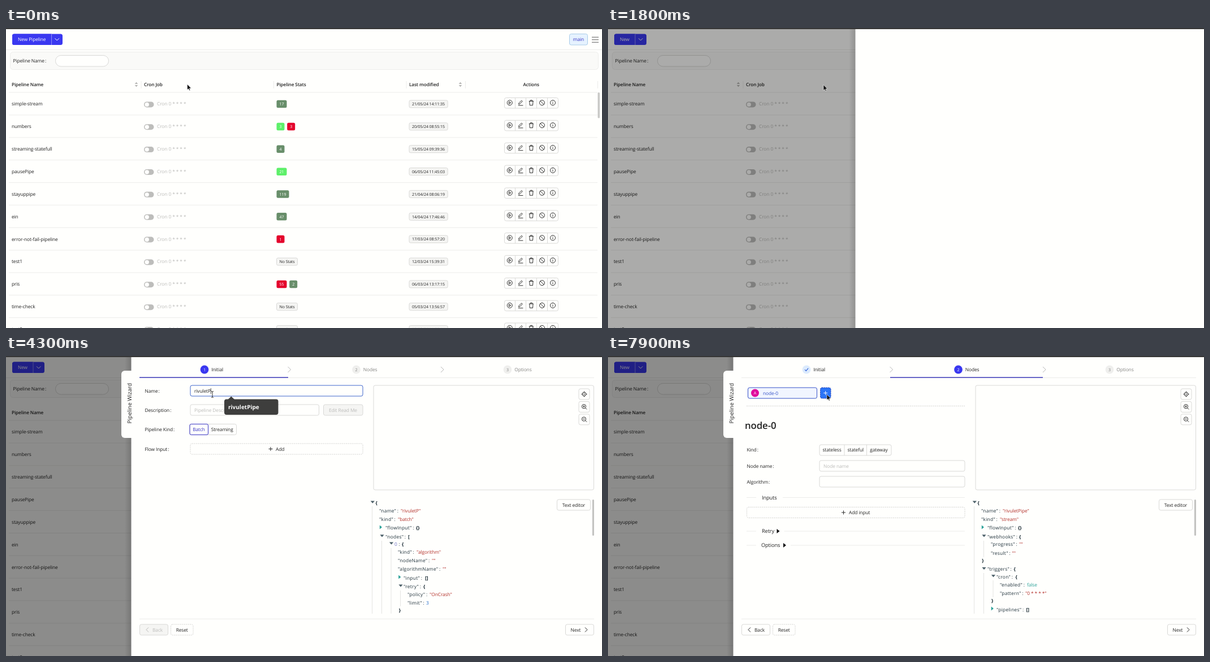
Animation, 1054 px wide and 531 px high, one loop 8000 ms. Source, as an HTML page:

```html
<!DOCTYPE html>
<html lang="en">
<head>
<meta charset="utf-8">
<title>Pipeline wizard</title>
<style>
  html, body { margin: 0; width: 100%; height: 100%; overflow: hidden; background: #fffffd; }
  svg { display: block; width: 100%; height: 100%; }
  text { font: 8.4px "Open Sans", "Noto Sans", sans-serif; letter-spacing: -.1px; fill: #222;
         text-rendering: geometricPrecision; white-space: pre; }
  .b { font-weight: 600; font-size: 8.2px; }
  .mid { text-anchor: middle; }
  .w { fill: #fff; }
  .dim { fill: #bcbcba; }
  .gray { fill: #858583; }
  .s { font-size: 7.1px; }
  .blue { fill: #3733c4; }
  .key { fill: #20323c; letter-spacing: .25px; }
  .str { fill: #b3302a; }
  .num { fill: #2a6fc9; }
  .bool { fill: #2aa198; }
  .br { font-weight: 700; fill: #14252e; }
  .div { font-size: 9.2px; }
  .box { fill: #fffffd; stroke: #d9d9d7; }
  .off { fill: #f5f5f3; stroke: #d9d9d7; }
  .dash { fill: #fffffd; stroke: #d2d2d0; stroke-dasharray: 2 1.4; }
  .line { stroke: #ececea; fill: none; }
  .ico { fill: none; stroke: #222; stroke-width: .95; }
</style>
</head>
<body>
<svg id="stage" viewBox="0 0 1054 531" preserveAspectRatio="none"></svg>
<script>
const LOOP = 8000, STEP = 100;
const PAPER = '#fffffd', PRIMARY = '#3a38f0', HOVER = '#4278f2', PIPE = 'rivuletPipe';

// drawing helpers
const text = (x, y, s, cls = '', more = '') => `<text x="${x}" y="${y}" class="${cls}" ${more}>${s}</text>`;
const rect = (x1, y1, x2, y2, r = 0, more = 'class="box"') =>
  `<rect x="${x1}" y="${y1}" width="${x2 - x1}" height="${y2 - y1}" rx="${r}" ${more}/>`;
const path = (d, more = 'class="ico"') => `<path d="${d}" ${more}/>`;
const disc = (x, y, r, more = 'class="ico"') => `<circle cx="${x}" cy="${y}" r="${r}" ${more}/>`;
const hline = (x1, x2, y, cls = 'line') => path(`M${x1} ${y}H${x2}`, `class="${cls}"`);
const group = (id, body, more = '') => `<g id="${id}" ${more}>${body}</g>`;
const label = (y, s) => text(245.5, y, `${s}<tspan dx="1">:</tspan>`);
const plus = (x, y, color = '#222') => path(`M${x - 3.5} ${y}h7M${x} ${y - 3.5}v7`, `class="ico" style="stroke:${color}"`);
const chevron = (x, y, w, color) =>
  path(`M${x - w / 2} ${y - Math.abs(w)}l${w} ${Math.abs(w)}l${-w} ${Math.abs(w)}`, `fill="none" stroke="${color}"`);

// page with the table
const GREEN = '#688e6a', LIME = '#5ef06a', RED = '#e4042c';
const ROWS = [
  ['simple-stream', '21/05/24 14:11:35', [17, GREEN]],
  ['numbers', '20/05/24 08:55:15', [3, LIME], [3, RED]],
  ['streaming-statefull', '15/05/24 09:39:36', [4, GREEN]],
  ['pausePipe', '06/05/24 11:45:03', [21, LIME]],
  ['stayuppipe', '21/04/24 08:06:19', [119, GREEN]],
  ['ein', '14/04/24 17:46:46', [47, GREEN]],
  ['error-not-fail-pipeline', '17/03/24 08:57:20', [1, RED]],
  ['test1', '12/03/24 15:39:31'],
  ['pris', '06/03/24 13:17:15', [55, RED], [2, GREEN]],
  ['time-check', '05/03/24 13:56:57'],
  ['test2', '05/03/24 11:20:41']
];

function splitButton(name, mid, end) {
  return rect(11, 10.5, end, 30, 3.5, `fill="${PRIMARY}"`) +
    path(`M14.5 10.5H${mid}V30H14.5a3.5 3.5 0 0 1-3.5-3.5V14a3.5 3.5 0 0 1 3.5-3.5`, `class="face" fill="${PRIMARY}"`) +
    path(`M${mid} 10.5V30`, 'stroke="#8f8ff8"') +
    text((11 + mid) / 2, 23.2, name, 'w mid') +
    path(`M${mid + 6} 18.3l3.7 3.7 3.7-3.7`, 'fill="none" stroke="#fff"');
}

function actions() {
  let s = rect(881.5, 123.5, 976.5, 142, 3);
  for (let i = 1; i < 5; i++) s += path(`M${881.5 + i * 19} 123.5V142`, 'stroke="#d9d9d7"');
  for (const x of [890.8, 948, 967]) s += disc(x, 132.3, 4.5);
  return s + path('M889.4 130.2v4.2l3.6-2.1z') +
    path('M905.8 137h8.6M906.6 135l.5-2.2 4.6-4.6 1.6 1.6-4.6 4.6z') +
    path('M924.8 129.5h8.2M927.3 129.3v-1.5h3.2v1.5M925.8 129.8l.5 7h5.2l.5-7') +
    path('M944.9 129.1l6.3 6.3') + path('M967 131.6v3M967 129.6v1');
}

function tableRow([name, date, ...stats], i) {
  const y = 134.4 + i * 39.86;
  let s = text(10, y + 3, name) +
    rect(244, y - 4, 261.5, y + 6, 5, 'fill="#bdbdbb"') + disc(249.2, y + 1, 3.7, 'fill="#fffffd"') +
    text(267, y + 3, 'Cron 0 * * * *', 'dim');
  let x = 478.5;
  for (const [n, color] of stats) {
    const w = 10 + 4 * String(n).length;
    s += rect(x, y - 6.6, x + w, y + 6.9, 2.5, `fill="${color}"`) + text(x + w / 2, y + 3, n, 's w mid');
    x += w + 4.7;
  }
  if (!stats.length) s += rect(478.5, y - 6.4, 515.5, y + 6.6, 2.5, 'class="off"') + text(497, y + 2.8, 'No Stats', 's mid');
  s += `<g class="date">${rect(713, y - 6.4, 781.2, y + 6.6, 2.5, 'class="off"')}${text(747, y + 2.9, date, 's mid')}</g>`;
  return s + `<use href="#acts" y="${i * 39.86}"/>` + hline(5, 1046, (y + 19.6).toFixed(1));
}

function page() {
  const sorter = x => path(`M${x - 2.8} 99l2.8-3.3 2.8 3.3zM${x - 2.8} 101l2.8 3.3 2.8-3.3z`, 'fill="#b4b4b2"');
  let s = group('longBtn', splitButton('New Pipeline', 80.5, 100)) +
    group('shortBtn', splitButton('New', 48, 68)) +
    rect(996.5, 10.5, 1028.5, 30, 3, 'fill="#e6f2ff" stroke="#a8cbe8"') + text(1012.5, 23.2, 'main', 'mid blue') +
    path('M1036 16.2h12M1036 20.7h12M1036 25.2h12', 'stroke="#5c5c5c" stroke-width="1.1"') +
    hline(0, 1054, 38.5) +
    rect(7.5, 42.5, 1047.5, 73.5, 5, 'fill="#fafaf8" stroke="#eeeeec"') +
    text(12.5, 61.3, 'Pipeline Name<tspan dx="1">:</tspan>') + rect(87.5, 48.5, 181.5, 68, 9.7);
  for (const [x, name] of [[10, 'Pipeline Name'], [244, 'Cron Job'], [478.5, 'Pipeline Stats'], [713, 'Last modified'], [914.5, 'Actions']])
    s += text(x, 103, name, 'b');
  for (const x of [239, 473.5, 708, 812.5, 1046.5]) s += path(`M${x} 94V107`, 'class="line"');
  return s + sorter(230.5) + sorter(803.5) + hline(5, 1046, 114) + ROWS.map(tableRow).join('') +
    rect(1046.5, 114, 1050, 159.5, 1.5, 'fill="#c8c8c6"');
}

// wizard
function step(n, x, name, on, done) {
  const fill = on ? PRIMARY : done ? '#dcebfd' : '#efefed';
  return disc(x, 24, 7.4, `fill="${fill}"`) +
    (done ? path(`M${x - 3} 24l2.2 2.4 4-4.8`, 'fill="none" stroke="#2f5fd8" stroke-width="1.1"')
          : text(x, 26.8, n, `s mid ${on ? 'w' : 'gray'}`)) +
    text(x + 12.3, 27, name, on || done ? '' : 'gray');
}

function steps(active, x1, x2) {
  return step(1, 351, 'Initial', active === 1, active > 1) + step(2, 619.5, 'Nodes', active === 2) +
    step(3, 887, 'Options') + path(`M${x1} 38H${x2}`, 'stroke="#3a37b8" stroke-width="1.5"');
}

function kindPicker(on) {
  const edge = on ? [357.5, 407.5] : [325, 357.5];
  return rect(325, 120.5, 407.5, 139.5, 3) + rect(edge[0], 120.5, edge[1], 139.5, 2.5, 'fill="none" stroke="#3733c4"') +
    text(341, 133, 'Batch', on ? 'mid' : 'mid blue') + text(382.2, 133, 'Streaming', on ? 'mid blue' : 'mid') +
    (on ? disc(428.8, 128.3, 5.6, 'fill="#111"') + text(428.8, 131.3, '?', 'mid w b') : '');
}

function initialPage() {
  return label(64.5, 'Name') + label(99, 'Description') + label(133, 'Pipeline Kind') + label(167.5, 'Flow Input') +
    rect(326, 52, 631, 71, 3, 'class="box" id="nameBox"') +
    text(333, 64.5, 'Unique Identifier', 'dim', 'id="hint"') + text(333, 64.5, '', '', 'id="typed"') +
    path('M0 57V67', 'id="caret" stroke="#222" stroke-width=".8"') +
    rect(326, 86, 553.5, 105, 3, 'class="box" id="descBox"') + text(333, 99, 'Pipeline Description', 'dim') +
    rect(561.5, 86, 631, 105, 3, 'class="off"') + text(596, 99, 'Edit Read Me', 'mid dim') +
    group('batch', kindPicker(false)) + group('stream', kindPicker(true)) +
    group('add', rect(326, 155, 631, 174, 3, 'class="dash"') + plus(468, 164.5) + text(477, 167.5, 'Add')) +
    group('addHover', rect(326, 155, 631, 174, 3, 'class="dash" style="stroke:#6f86dc"') +
      plus(468, 164.5, '#3f58c0') + text(477, 167.5, 'Add', 'blue'));
}

function nodesPage() {
  const divider = (y, name, x, tri) => hline(245, 262, y) + hline(tri ? tri + 11 : 309, 631, y) + text(x, y + 3.2, name, 'div') +
    (tri ? path(`M${tri - 2} ${y - 4}l5 4-5 4z`, 'fill="#111"') : '');
  return rect(247.5, 56, 369.5, 75, 3, 'fill="#f1f5ff" stroke="#3550c8"') + disc(260, 65.5, 7, 'fill="#e0089c"') +
    text(260, 68.2, 'A', 's w mid') + text(274, 68.7, 'node-0', '', 'style="fill:#3a56c8"') +
    rect(375.5, 56, 394, 75, 3, `id="plusBox" stroke="#2436a8" stroke-dasharray="2 1.4" fill="${PRIMARY}"`) + plus(384.7, 65.5, '#fff') +
    path('M245 88.5H631', 'stroke="#d2d2d0" stroke-dasharray="2 1.4"') +
    text(242, 129.3, 'node-0', 'b', 'style="font-size:16.8px"') +
    label(169, 'Kind') + label(197.5, 'Node name') + label(226, 'Algorithm') +
    rect(374, 157, 501, 176, 3) + path('M418 157V176M457.5 157V176', 'stroke="#d9d9d7"') +
    text(396, 169.3, 'stateless', 'mid') + text(437.7, 169.3, 'stateful', 'mid') + text(479, 169.3, 'gateway', 'mid') +
    rect(374, 185, 631, 204, 3) + text(381, 197.5, 'Node name', 'dim') + rect(374, 213, 631, 232, 3) +
    divider(250.5, 'Inputs', 272) + rect(245.5, 267.5, 631, 286.5, 3, 'class="dash"') + plus(416.5, 277) + text(426, 280, 'Add input') +
    divider(310, 'Retry', 272, 300.5) + divider(335, 'Options', 271, 312);
}

// JSON tree: each entry is key, value, value class
const entry = (x, y, key, vx, val, cls = 'str', id = '') =>
  text(x, y + 3, `"${key}"<tspan dx="1.6">:</tspan>`, 'key') + text(vx, y + 3, val, cls, id && `id="${id}"`);
const opened = (x, y) => path(`M${x - 3.6} ${y - 1.8}h7.2l-3.6 4.2z`, 'fill="#4b5f68"');
const closed = (x, y) => path(`M${x - 1.8} ${y - 3.4}l4.2 3.4-4.2 3.4z`, 'fill="#2aa198"');
const guide = (x, y1, y2) => path(`M${x} ${y1}V${y2}`, 'stroke="#e4e4e2"');

function treeHead() {
  return guide(647.5, 266, 456) + opened(648.3, 258.3) + text(653.5, 263, '{', 'br') +
    entry(660, 273.5, 'name', 698, '', 'str', 'jsonName') + entry(660, 289, 'kind', 693, '', 'str', 'jsonKind') +
    closed(662.6, 303) + entry(671, 304.3, 'flowInput', 725, '{}', 'br') + opened(665, 318);
}
function treeNodes() {
  return guide(664.5, 327, 456) + guide(681, 340, 456) + guide(697.5, 415, 443) +
    entry(671, 320, 'nodes', 711, '[', 'br') +
    opened(681.5, 331.3) + text(687, 336.3, '0', '', 'style="fill:#6c71c4"') + text(694.5, 336.3, ':', 'key') + text(700, 336.3, '{', 'br') +
    entry(693, 346.7, 'kind', 726, '"algorithm"') + entry(693, 362, 'nodeName', 753, '""') +
    entry(693, 377.4, 'algorithmName', 772, '""') +
    closed(696, 391.2) + entry(703, 392.7, 'input', 741, '[]', 'br') +
    opened(698, 406.3) + entry(703, 408, 'retry', 738, '{', 'br') +
    entry(710, 421.6, 'policy', 749, '"OnCrash"') + entry(710, 437, 'limit', 743, '3', 'num') + text(694.7, 453.4, '}', 'br');
}
function treeHooks() {
  return guide(664.5, 327, 356) + guide(664.5, 384, 456) + guide(681, 397, 427) +
    entry(671, 320, 'webhooks', 727, '{', 'br') + entry(677, 333.4, 'progress', 727, '""') +
    entry(677, 348.7, 'result', 714.5, '""') + text(661.3, 365.2, '}', 'br') +
    opened(665, 375.8) + entry(671, 377.4, 'triggers', 717.5, '{', 'br') +
    opened(681.5, 389) + entry(687, 391, 'cron', 720.5, '{', 'br') +
    entry(693, 404.6, 'enabled', 741, 'false', 'bool') + entry(693, 420, 'pattern', 738, '"0 * * * *"') +
    text(678, 436.4, '}', 'br') + closed(679.5, 447) + entry(687, 448.7, 'pipelines', 739.5, '[]', 'br');
}

function sidePanel() {
  let s = rect(650, 52, 1039.5, 237, 3);
  for (const y of [67.5, 90, 112.3]) s += rect(1013, y - 9.5, 1032, y + 9.5, 3);
  s += disc(1022.5, 67.5, 3.3) + disc(1022.5, 67.5, 1, 'fill="#111"') + path('M1022.5 62.5v2.2M1022.5 70.3v2.2M1017.5 67.5h2.2M1025.3 67.5h2.2');
  for (const y of [89.3, 111.6]) s += disc(1022, y, 3.6) + path(`M1024.7 ${y + 2.7}l2.5 2.5M1020.2 ${y}h3.6`);
  return s + path('M1022 87.5v3.6') + treeHead() + group('treeNodes', treeNodes()) + group('treeHooks', treeHooks()) +
    rect(974.5, 254, 1033.5, 273, 3) + text(1004, 266.8, 'Text editor', 'mid') + rect(1036.8, 254, 1040, 318, 1.5, 'fill="#c4c4c2"');
}

function wizard() {
  const back = (cls, color) => rect(236.5, 475, 286.5, 494, 3, `class="${cls}"`) + chevron(250, 484.5, -4, color) +
    text(259, 487.5, 'Back', cls === 'off' ? 'dim' : '');
  return group('tab', path('M222 26H210a6 6 0 0 0-6 6V139a6 6 0 0 0 6 6H222z', `fill="${PAPER}"`) +
      text(0, 0, 'Pipeline Wizard', '', 'transform="translate(221.6 119.5) rotate(-90)" style="font-size:10px;letter-spacing:0"')) +
    group('content', hline(236, 1040, 38.5) +
      group('steps1', steps(1, 236, 499)) + group('steps2', steps(2, 499, 769)) +
      chevron(501, 24, 5, '#b8b8b6') + chevron(771.5, 24, 5, '#b8b8b6') +
      group('initial', initialPage()) + group('nodes', nodesPage()) + group('side', sidePanel()) +
      hline(236, 1040, 465.5) + group('backOff', back('off', '#b8b8b6')) + group('backOn', back('box', '#222')) +
      rect(291.5, 475, 331, 494, 3, 'class="dash"') + text(311.2, 487.5, 'Reset', 'mid') +
      rect(989.5, 475, 1039.5, 494, 3) + text(998.5, 487.5, 'Next') + chevron(1026, 484.5, 4, '#222') +
      group('tip', rect(386, 76.5, 481.5, 104, 4, 'fill="#3e3e3d"') + path('M392.5 77l5.8-5.5 5.8 5.5z', 'fill="#3e3e3d"') +
        text(393, 94, PIPE, 'w', 'style="font:600 10px \'Noto Sans\',sans-serif;letter-spacing:0"')));
}

const stage = document.getElementById('stage');
stage.innerHTML =
  `<defs><linearGradient id="shade"><stop offset="0" stop-opacity="0"/><stop offset="1" stop-opacity=".16"/></linearGradient>${group('acts', actions())}</defs>` +
  rect(0, 0, 1054, 531, 0, `fill="${PAPER}"`) + page() +
  rect(0, 0, 1054, 531, 0, 'id="mask" fill="#000"') +
  group('drawer', rect(210, 0, 222, 531, 0, 'fill="url(#shade)"') + rect(221.5, 0, 1054, 531, 0, `fill="${PAPER}"`) + wizard()) +
  rect(0, 0, 1054, 2, 0, 'fill="#363636"') +
  group('arrow', path('M0 0V10L2.3 8 3.8 11.3 5.4 10.6 3.9 7.4 7 7.2z', 'fill="#111" stroke="#fff" stroke-width=".6"')) +
  group('beam', path('M-2 -5.5q2 0 2 1.5V4q0 1.5-2 1.5M2 -5.5q-2 0-2 1.5M0 4q0 1.5 2 1.5', 'fill="none" stroke="#222" stroke-width=".9"'));

// timing
const el = Object.fromEntries([...stage.querySelectorAll('[id]')].map(e => [e.id, e]));
const faces = stage.querySelectorAll('.face'), dates = stage.querySelectorAll('.date');
const POINTER = [[0, 320.5, 99.5], [800, 46, 19], [1100, 46, 19], [1600, 381, 100.5], [2000, 381, 100.5], [2400, 361, 79.5],
  [2700, 365, 68], [5200, 365, 68], [5600, 384, 131], [6000, 384, 131], [6200, 440, 157], [6400, 526.5, 129.5],
  [7000, 649, 24], [7200, 649, 24], [7800, 387, 68]];
const SLIDE = [[1600, 1052], [1700, 765], [1800, 437.5], [1900, 221.5]];
const SHADE = [[1500, 0], [1600, .01], [1800, .33], [1900, .42], [2000, .45]];
const KEYS = [3400, 3500, 3600, 3700, 3800, 3900, 4000, 4300, 4500, 4600, 4800];

function at(keys, t, col = 1, ease = k => k) {
  const i = keys.findIndex(k => k[0] > t);
  if (i === 0) return keys[0][col];
  if (i < 0) return keys[keys.length - 1][col];
  const a = keys[i - 1], b = keys[i];
  return a[col] + (b[col] - a[col]) * ease((t - a[0]) / (b[0] - a[0]));
}
const smooth = k => k * k * (3 - 2 * k);
const show = (id, on) => { el[id].style.display = on ? '' : 'none'; };

function render(t) {
  const within = (a, b) => t >= a && t < b;
  const renamed = t >= 1100, streaming = t >= 5700, onNodes = t >= 7200, focused = within(2900, 5700);

  show('longBtn', !renamed);
  show('shortBtn', renamed);
  faces.forEach(f => f.setAttribute('fill', within(700, 1700) ? HOVER : PRIMARY));
  dates.forEach(d => d.setAttribute('transform', `translate(${t < 1500 ? 0 : -.6} 0)`));

  el.mask.setAttribute('opacity', at(SHADE, t));
  show('drawer', t >= 1600);
  el.drawer.setAttribute('transform', `translate(${at(SLIDE, t) - 221.5} 0)`);
  show('tab', t >= 2100);
  show('content', t >= 2100);
  show('side', t >= 3300);

  const typed = PIPE.slice(0, KEYS.filter(k => k <= t).length);
  el.typed.textContent = typed;
  el.jsonName.textContent = `"${typed}"`;
  el.jsonKind.textContent = streaming ? '"stream"' : '"batch"';
  show('hint', !typed);
  show('caret', focused);
  const end = typed && !onNodes && t >= 2100 ? el.typed.getComputedTextLength() : 0;
  el.caret.setAttribute('transform', `translate(${333.4 + end} 0)`);
  el.nameBox.style.stroke = focused ? '#3f66cc' : within(2600, 2900) ? '#8f96c8' : '';
  el.descBox.style.stroke = within(2200, 2600) ? '#a0a6cc' : '';
  show('tip', within(3500, 4900));

  show('batch', !streaming);
  show('stream', streaming);
  show('addHover', within(6200, 6600));
  show('add', !within(6200, 6600));

  for (const id of ['steps2', 'nodes', 'treeHooks', 'backOn']) show(id, onNodes);
  for (const id of ['steps1', 'initial', 'treeNodes', 'backOff']) show(id, !onNodes);
  el.plusBox.setAttribute('fill', t >= 7800 ? '#2b74f6' : PRIMARY);

  const beam = within(2700, 5100);
  show('beam', beam);
  show('arrow', !beam);
  const spot = `translate(${at(POINTER, t, 1, smooth)} ${at(POINTER, t, 2, smooth)})`;
  el.arrow.setAttribute('transform', spot);
  el.beam.setAttribute('transform', spot);
}

const start = performance.now();
function tick() {
  const t = (performance.now() - start) % LOOP;
  render(Math.floor(t / STEP) * STEP);
  requestAnimationFrame(tick);
}
tick();
</script>
</body>
</html>
```
